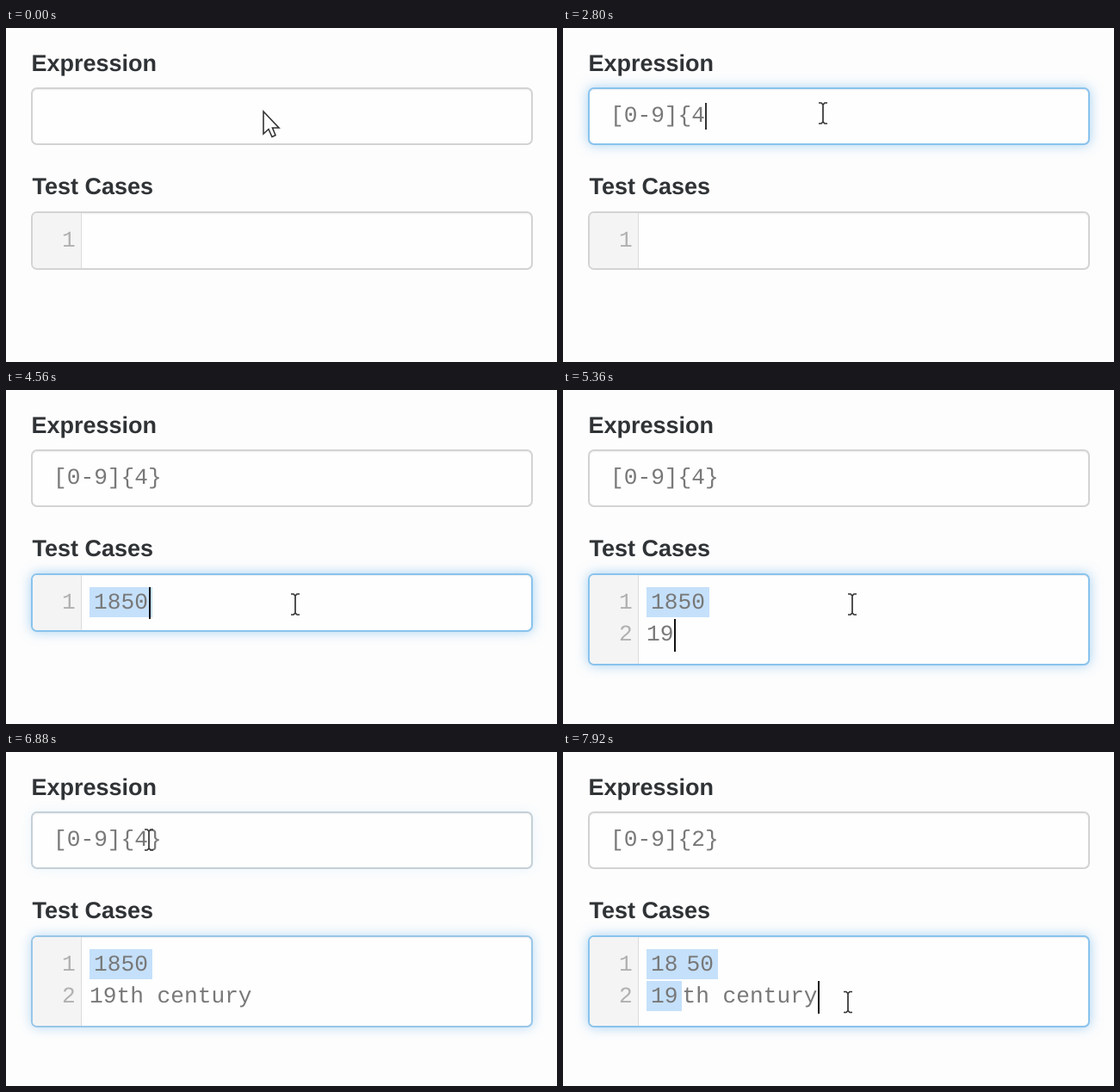
These frames come from a looping animation (640x388 px, 8 s). An HTML page:

```html
<!DOCTYPE html>
<html lang="en">
<head>
<meta charset="utf-8">
<title>Expression tester</title>
<style>
  html, body { margin: 0; width: 100%; height: 100%; overflow: hidden; background: #fdfdfd; }
  #stage { position: relative; width: 640px; height: 388px; overflow: hidden; text-rendering: geometricPrecision; }
  #stage > * { position: absolute; margin: 0; }
  h2 { left: 29.5px; font: bold 27px/30px "Liberation Sans", Arial, sans-serif; color: #303336; white-space: nowrap; }
  .box { left: 29px; width: 583px; box-sizing: border-box; border: 2px solid; border-radius: 7px; background: #fefefe; overflow: hidden; }
  .gutter { width: 56px; height: 100%; background: #f4f4f4; border-right: 1px solid #dcdcdc; }
  pre { font: 26.2px/37.4px "Liberation Mono", "Courier New", monospace; color: #787878; }
  mark { background: #c5e0fa; color: inherit; padding: 3px 5px 2px; }
  pre i { position: absolute; width: 2px; height: 37.4px; margin-left: .8px; background: #111; }
  #expression { left: 55px; top: 87.3px; line-height: 31px; }
  #expression i { width: 1.6px; height: 31px; margin: 0; background: #333; }
  #numbers { left: 65px; top: 228.8px; color: #b0b0b0; }
  #cases { left: 97px; top: 228.8px; }
  svg { left: 0; top: 0; }
</style>
</head>
<body>
<div id="stage">
  <h2 style="top:25.5px">Expression</h2>
  <h2 style="top:168.5px;left:30.5px">Test Cases</h2>
  <div class="box" id="exprBox" style="top:69px;height:67px"></div>
  <div class="box" id="caseBox" style="top:213px"><div class="gutter"></div></div>
  <pre id="expression"></pre>
  <pre id="numbers"></pre>
  <pre id="cases"></pre>
  <svg width="640" height="388">
    <path id="arrow" d="M0 0V26L6 20.5L10 29.5L14 27.5L10.5 19H18Z" fill="#fff" stroke="#333" stroke-width="1.6"/>
    <path id="beam" d="M-5-12h3l2 2 2-2h3M0-10V10M-5 12h3l2-2 2 2h3" fill="none" stroke="#333" stroke-width="1.7"/>
  </svg>
</div>
<script>
const LOOP = 8000, STEP = 80;
const $ = id => document.getElementById(id);

// [time, text]: "|" is the caret, parentheses enclose a match
const expression = [
  [0, ''], [560, '|'], [880, '[|'], [1120, '['], [1280, '[]'], [1440, '[]|'], [1520, '[|]'],
  [1680, '[0|]'], [1840, '[0]'], [2000, '[0-|]'], [2080, '[0-9|]'], [2160, '[0-9]'],
  [2320, '[0-9]|'], [2560, '[0-9]{|'], [2720, '[0-9]{4|'], [2960, '[0-9]{4}|'],
  [3120, '[0-9]{4}'], [6960, '[0-9]{4|}'], [7200, '[0-9]{|}'], [7280, '[0-9]{2|}'], [7840, '[0-9]{2}']
];
const cases = [
  [0, ''], [3600, '|'], [3920, '1|'], [4080, '18|'], [4240, '185|'], [4400, '1850|'],
  [4560, '(1850|)'], [4800, '(1850)'], [4960, '(1850)\n|'], [5200, '(1850)\n'],
  [5360, '(1850)\n19|'], [5440, '(1850)\n19t|'], [5600, '(1850)\n19th|'],
  [5760, '(1850)\n19th c|'], [5840, '(1850)\n19th ce|'], [5920, '(1850)\n19th cen|'],
  [6000, '(1850)\n19th centu|'], [6080, '(1850)\n19th centur|'], [6160, '(1850)\n19th century|'],
  [6320, '(1850)\n19th century'], [7200, '1850\n19th century'],
  [7360, '(18)(50)\n(19)th century'], [7840, '(18)(50)\n(19)th century|']
];
// [start, end, x, y]
const moves = [[3240, 3480, 336, 249], [6440, 6720, 166, 102], [7400, 7680, 331, 290.5]];

const ramp = (t, a, b) => Math.min(1, Math.max(0, (t - a) / (b - a)));
const smooth = k => k * k * (3 - 2 * k);
const textAt = (keys, t) => keys.findLast(([at]) => at <= t)[1];
const markup = text => text.replace('|', '<i></i>')
  .replaceAll('(', '<mark>').replaceAll(')', '</mark>');

function setFocus(box, k) {
  const [r, g, b] = [[211, 137], [211, 195], [211, 237]].map(([from, to]) => from + (to - from) * k);
  box.style.borderColor = `rgb(${r},${g},${b})`;
  box.style.boxShadow = `inset 0 1px 2px rgba(0,0,0,.06), 0 0 14px rgba(82,168,236,${.5 * k})`;
}

function drawMouse(t) {
  let x = 302, y = 99;
  for (const [start, end, toX, toY] of moves) {
    const k = smooth(ramp(t, start, end));
    x += (toX - x) * k;
    y += (toY - y) * k;
  }
  const overBox = t >= 480 && (y < 136 || y > 214);
  $('beam').style.display = overBox ? '' : 'none';
  $('arrow').style.display = overBox ? 'none' : '';
  $('beam').setAttribute('transform', `translate(${x} ${y})`);
  $('arrow').setAttribute('transform', `translate(${x - 3} ${y - 2})`);
}

function draw(now) {
  const t = Math.floor(now % LOOP / STEP) * STEP;
  const lines = textAt(cases, t);
  const twoLines = lines.includes('\n');
  $('expression').innerHTML = markup(textAt(expression, t));
  $('cases').innerHTML = markup(lines);
  $('numbers').textContent = twoLines ? '1\n2' : '1';
  $('caseBox').style.height = (twoLines ? 107 : 68) + 'px';

  const first = ramp(t, 460, 660), second = ramp(t, 3460, 3660);
  const back = ramp(t, 6840, 7040), last = ramp(t, 7760, 7920);
  setFocus($('exprBox'), first - second + back - last);
  setFocus($('caseBox'), second - back + last);
  drawMouse(t);
}

const began = performance.now();
function tick() {
  draw(performance.now() - began);
  requestAnimationFrame(tick);
}
tick();
</script>
</body>
</html>
```
